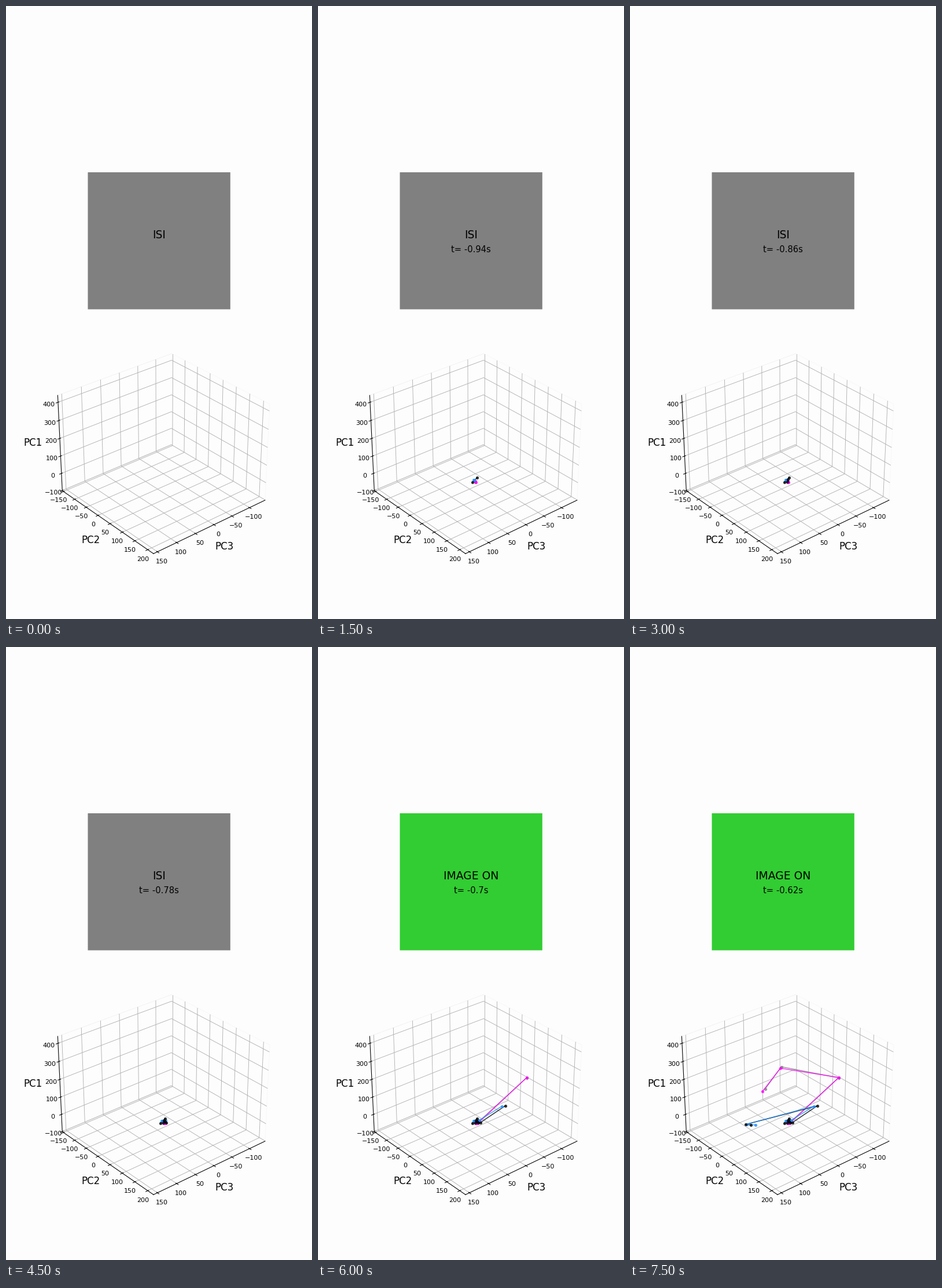
Recreate the animation shown at these times as a matplotlib script. Size 529 by 1058 pixels, loop 8000 ms.

```python
import numpy as np
import matplotlib.pyplot as plt
from matplotlib.animation import FuncAnimation
from matplotlib.patches import Rectangle

W, H, DPI = 529, 1058, 64
PT = 72 / DPI  # points per pixel

INTERVAL = 250
FRAMES = 32
FRAMES_PER_STEP = 3
REST_STEPS = 7

plt.rcParams.update({
    "font.family": "DejaVu Sans",
    "axes.linewidth": 1.2,
    "grid.linewidth": 1.0,
    "xtick.major.width": 1.2,
    "ytick.major.width": 1.2,
})

fig = plt.figure(figsize=(W / DPI, H / DPI), dpi=DPI, facecolor="#fdfdfd")


def make_box():
    """Empty 3D box with its grid, ticks and axis names."""
    left, bottom, side = 68.5, 91.1, 395.3
    box = fig.add_axes([left / W, bottom / H, side / W, side / H],
                       projection="3d", facecolor="none")
    box.view_init(elev=30, azim=50)
    box.set_xticks(range(-100, 151, 50))
    box.set_yticks(range(-150, 201, 50))
    box.set_zticks(range(-100, 401, 100))
    box.set(xlim=(-145, 160), ylim=(-155, 222), zlim=(-101.5, 437.5))
    box.tick_params(labelsize=11.1 * PT, pad=2)
    names = {"PC3": box.xaxis, "PC2": box.yaxis, "PC1": box.zaxis}
    for name, axis in names.items():
        axis.pane.fill = False
        axis.set_label_text(name, fontsize=16.6 * PT)
        axis.labelpad = 9.5


make_box()

# Overlay measured in stage pixels, y pointing down.
ax = fig.add_axes([0, 0, 1, 1])
ax.set_xlim(0, W)
ax.set_ylim(H, 0)
ax.axis("off")

screen = ax.add_patch(Rectangle((141.5, 287), 246.3, 236.5, lw=0, snap=False))


def caption(baseline, size):
    return ax.text(264.5, baseline, "", fontsize=size * PT, ha="center",
                   va="baseline")


state_text = caption(401, 18.7)
time_text = caption(425, 14.7)


class Trajectory:
    """A settling wobble that drifts at rest, then jumps between targets."""

    def __init__(self, color, start, drift, swing, jumps):
        i = np.arange(REST_STEPS)[:, None]
        s = i / (REST_STEPS - 1)
        rest = (np.array(start) + np.array(drift) * s**2
                + np.array(swing) * (-0.6) ** i)
        self.points = np.vstack([rest, jumps])
        style = dict(color=color, alpha=0.8)
        self.line, = ax.plot([], [], lw=1.5 * PT, **style)
        self.dots, = ax.plot([], [], "o", ms=5.2 * PT, mew=0, **style)

    def show(self, count):
        for artist in (self.line, self.dots):
            artist.set_data(*self.points[:count].T)


trajectories = [
    Trajectory("gray", (272, 821), (4, 0), (0, -1),
               [(360.5, 743.5), (261.5, 724.5), (233.5, 763)]),
    Trajectory("magenta", (272.5, 821.5), (4.5, 0), (-0.5, -1),
               [(361, 743), (260, 727), (229, 767)]),
    Trajectory("dodgerblue", (269, 818), (9.5, -1), (1, 0),
               [(318, 792.5), (202, 823.5), (217, 825)]),
    Trajectory("black", (270, 819), (10.5, 2), (5, -5),
               [(323.5, 792), (200, 824), (209, 825)]),
]
# The blue line runs over the black one, the black dots stay on top.
trajectories[2].line.set_zorder(2.1)
trajectories[2].dots.set_zorder(2.2)
trajectories[3].dots.set_zorder(2.3)


def update(frame):
    step = frame // FRAMES_PER_STEP
    image_on = step >= REST_STEPS
    screen.set_facecolor("limegreen" if image_on else "gray")
    state_text.set_text("IMAGE ON" if image_on else "ISI")
    seconds = round(-1.02 + 0.04 * step, 2)
    time_text.set_text(f"t= {seconds}s" if step else "")
    for path in trajectories:
        path.show(step)
    return []


anim = FuncAnimation(fig, update, frames=FRAMES, interval=INTERVAL,
                     init_func=lambda: update(0), repeat=True, repeat_delay=0)
plt.show()
```
